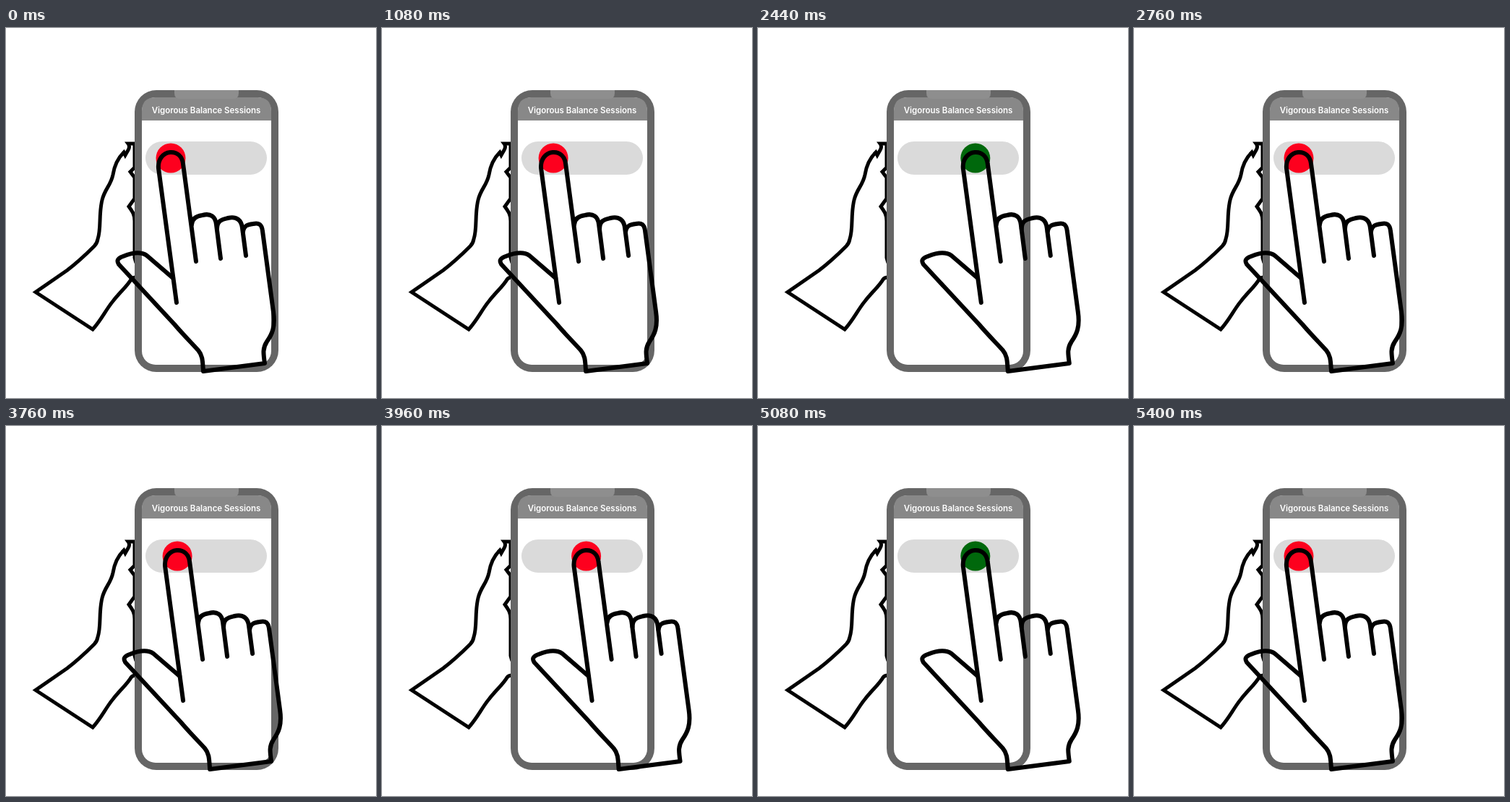
These frames come from a looping animation (512 by 512 pixels, 5.48 s). An HTML page:

```html
<!DOCTYPE html>
<html lang="en">
<head>
<meta charset="utf-8">
<title>Slide switch</title>
<style>
  html, body { margin: 0; width: 100%; height: 100%; overflow: hidden; background: #fff; }
  svg { display: block; width: 100%; height: 100%; }
  .line { fill: none; stroke: #000; stroke-width: 6; stroke-linecap: round; stroke-linejoin: round; }
  .holding { stroke-width: 5; stroke-linecap: butt; stroke-linejoin: miter; }
  text { font: 600 11.500px Inter, sans-serif; fill: #fff; text-anchor: middle; }
</style>
</head>
<body>
<svg viewBox="0 0 512 512">
  <path class="line holding" d="M179 160H169Q172 164 169 169L165 176L163 172
    C154 181 150 190 148 203C145 218 137 222 133 238C128 259 132 277 127 292
    Q126 298 122 302C111 313 98 325 85 335Q75 342 41 365.500L120 417
    C132 404 138 390 148 378C158 365 168 357 173 348Q175 345 180 345"/>
  <path class="line holding" d="M178 159V193L172 199L178 207V236L170 247
    C175 254 178 258 178 267V318L180 325"/>

  <rect x="178" y="86" width="199" height="390" rx="30" fill="#666"/>
  <rect x="188" y="96" width="179" height="370" rx="19" fill="#fff"/>
  <path d="M188 128V115Q188 96 207 96H348Q367 96 367 115V128Z" fill="#888"/>
  <path d="M233 86H322V90Q322 98 314 98H241Q233 98 233 90Z" fill="#8e8e8e"/>
  <text x="277" y="118">Vigorous Balance Sessions</text>
  <rect x="193" y="157" width="168" height="46" rx="23" fill="#dadada"/>

  <g id="slider">
    <circle id="knob" cx="228" cy="180" r="20.500"/>
    <g class="line">
      <path d="M236 380L211 194C210 182 217 173 227 172C237 171 244 178 245 188L263 323"/>
      <path d="M257 272C257 263 265 260 272 259C283 256 290 261 291 272L297 319"/>
      <path d="M292 278C292 266 299 265 307 263C319 260 326 266 327 277L332 315"/>
      <path d="M328 282C329 273 335 272 342 271C350 269 354 272 355 281L370 393
        C373 414 368 424 361 434C355 443 356 450 358 464L273 475
        C272 460 272 453 266 446C256 435 244 423 233 410L156 327
        C153 322 154 319 162 316C172 312 185 308 195 315L231 346"/>
    </g>
  </g>
</svg>
<script>
  const LOOP = 5480, STEP = 40, STEPS = 10, TRAVEL = 91;
  const slides = [1040, 2360, 3720, 5000];
  const slider = document.getElementById('slider');
  const knob = document.getElementById('knob');

  function draw(now) {
    const time = now % LOOP;
    let progress = 0, on = false;
    slides.forEach((start, i) => {
      if (time < start) return;
      const done = Math.min(STEPS, Math.floor((time - start) / STEP)) / STEPS;
      const turnsOn = i % 2 === 0;
      progress = turnsOn ? done : 1 - done;
      on = turnsOn === (done === 1);
    });
    slider.setAttribute('transform', `translate(${progress * TRAVEL} 0)`);
    knob.setAttribute('fill', on ? '#00680c' : '#fd001e');
  }

  const startTime = performance.now();
  function tick() {
    draw(performance.now() - startTime);
    requestAnimationFrame(tick);
  }
  tick();
</script>
</body>
</html>
```
